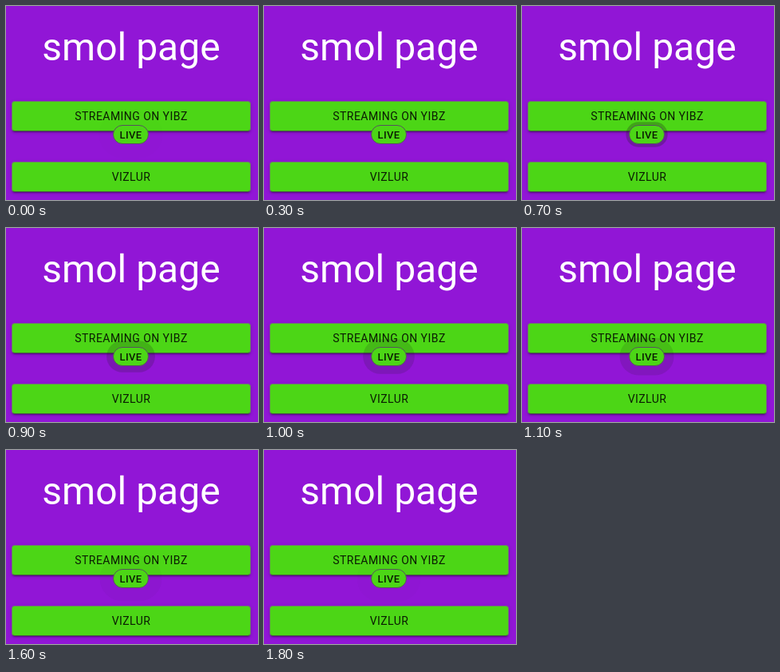
Animation of 316x243 px, one loop 1900 ms. Source, as an HTML page:

```html
<!DOCTYPE html>
<html lang="en">
<head>
<meta charset="utf-8">
<title>smol page</title>
<style>
  html, body {
    margin: 0;
    width: 100%;
    height: 100%;
    overflow: hidden;
    background: #9116d6;
    font-family: Roboto, Arial, sans-serif;
  }
  .stage {
    position: relative;
    width: 316px;
    height: 243px;
    overflow: hidden;
  }
  .stage > * {
    position: absolute;
    box-sizing: border-box;
    margin: 0;
    text-align: center;
    white-space: nowrap;
  }
  h1 {
    left: 7px;
    top: 23px;
    width: 300px;
    font-size: 48px;
    font-weight: 400;
    line-height: 57px;
    color: #fff;
  }
  .button, .chip {
    background: #4cd616;
    color: rgba(0, 0, 0, .87);
  }
  .button {
    left: 7px;
    width: 300px;
    height: 38px;
    border: 1px solid #6f7a6c;
    border-bottom-color: #47663f;
    border-radius: 4px;
    font-size: 14px;
    font-weight: 400;
    line-height: 36px;
    letter-spacing: .45px;
    box-shadow: 0 3px 1px -2px rgba(0, 0, 0, .2),
                0 2px 2px 0 rgba(0, 0, 0, .14),
                0 1px 5px 0 rgba(0, 0, 0, .12);
  }
  .chip {
    left: 134px;
    top: 149px;
    width: 45px;
    height: 24px;
    border: 1px solid #57525f;
    border-radius: 12px;
    font-size: 13px;
    font-weight: 500;
    line-height: 23px;
    letter-spacing: .02857em;
  }
</style>
</head>
<body>
<div class="stage">
  <h1>smol page</h1>
  <div class="button" style="top:119px">STREAMING ON YIBZ</div>
  <div class="button" style="top:195px">VIZLUR</div>
  <div class="chip" id="chip">LIVE</div>
</div>
<script>
  const LOOP = 1900, STEP = 100, PULSE_START = 400;
  const ring = (spread, alpha) =>
    `0 0 0 ${spread}px rgba(30,30,30,${alpha})`;

  const pulse = document.getElementById("chip").animate(
    [{ boxShadow: ring(0, .34) }, { boxShadow: ring(18, 0) }],
    { duration: LOOP, easing: "ease", fill: "both" }
  );
  pulse.pause();

  const start = performance.now();
  function draw() {
    const t = Math.max(0, performance.now() - start) % LOOP;
    let tick = Math.floor(t / STEP) * STEP;
    if (tick === PULSE_START) tick -= STEP; // the faded ring holds for two steps
    pulse.currentTime = (tick - PULSE_START + LOOP) % LOOP;
    requestAnimationFrame(draw);
  }
  draw();
</script>
</body>
</html>
```
